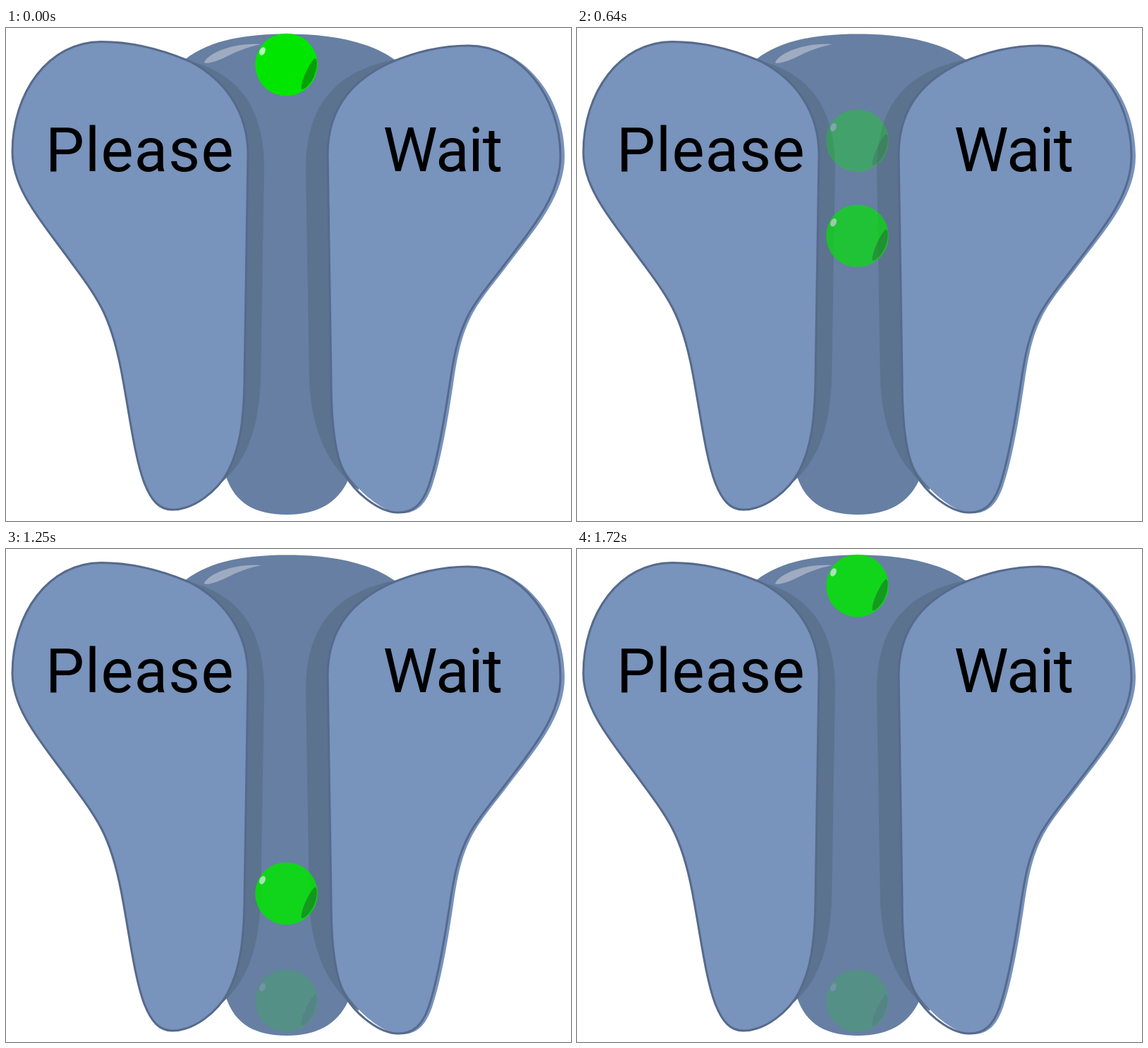
These frames come from a looping animation (801 px wide and 699 px high, 1750 ms). An HTML page:

```html
<!DOCTYPE html>
<html lang="en">
<head>
<meta charset="utf-8">
<title>Please Wait</title>
<style>
  html, body { margin: 0; width: 100%; height: 100%; overflow: hidden; background: #fff; }
  svg { display: block; }
  text { font: 400 87px Roboto, "Open Sans", sans-serif; }
  .wing { fill: #7893bc; }
  .edge { stroke: #566a8c; stroke-width: 3; }
  .shade { fill: #5b738f; }
</style>
</head>
<body>
<svg width="801" height="699" viewBox="0 0 801 699">
  <defs>
    <g id="ball">
      <circle r="44.3" fill="#00e600"/>
      <ellipse cx="-34" cy="-19" rx="4" ry="6" transform="rotate(25 -34 -19)" fill="#b8f7b8"/>
      <path d="M21.5 35C18.5 28 32 -2 40 -9C45 -10 44 7 38 19C33 29 25 36 21.5 35Z" fill="#05a005"/>
    </g>
  </defs>

  <path fill="#667fa3" d="M250 48C285 16 345 8.5 398 8.5C455 8.5 515 17 555 48L485 641
    C470 674 440 690 398 690C355 690 325 675 312 636Z"/>
  <path fill="#9fabc1" d="M281 49C284 38 318 20 362 23C340 28 330 32 318 38C300 47 284 52 281 49Z"/>
  <path class="shade" d="M265 48C335 68 366 120 366 200L361 500C358 560 346 613 300 649Z"/>
  <path class="shade" d="M580 40C500 50 425 80 425 200L430 500C433 570 455 620 500 655Z"/>

  <path class="wing edge" d="M135 19.5C60 19.5 9 92 9 176C9 228 50 274 88 326C106 351 126 376 139 404
    C152 432 160 465 166 500C176 555 183 610 196 645C206 670 217 683 236 683
    C268 683 300 655 314 630C331 598 337 560 338 500L343 180C343 120 312 75 262 48C225 32 180 19.5 135 19.5Z"/>
  <path class="wing" d="M657 25C737 25 792 100 792 182C792 238 749 286 712 335C695 358 676 379 662 404
    C645 436 640 465 634 505C626 558 617 612 604 650C595 675 583 688 561 688
    C535 688 500 658 482 630C467 605 461 560 461 500L457 180C457 105 500 70 545 49C580 34 615 25 657 25Z"/>
  <path class="edge" fill="none" d="M655 25C732 25 786 100 786 182C786 238 744 286 707 335C690 358 671 379 657 404
    C640 436 635 465 629 505C621 558 612 612 599 650C590 675 578 687 556 687
    C530 687 495 660 480 632C466 605 461 560 461 500L456 180C456 105 500 70 545 49C580 34 615 25 655 25Z"/>

  <text x="56" y="203" letter-spacing="1.2">Please</text>
  <text x="534.5" y="203" letter-spacing="-1">Wait</text>

  <use href="#ball" id="current"/>
  <use href="#ball" id="next"/>
</svg>
<script>
  const stops = [52, 159.7, 294.7, 488.5, 640.5];
  const HOLD = 200, STEP = 30, STEPS = 6;
  const SPAN = HOLD + STEP * (STEPS - 1);
  const [current, next] = ["current", "next"].map(id => document.getElementById(id));

  function place(ball, stop, opacity) {
    ball.setAttribute("transform", `translate(397.5 ${stops[stop % stops.length]})`);
    ball.setAttribute("opacity", opacity);
  }

  // Rest at each stop, then cross-fade to the following one in equal steps.
  function draw() {
    const t = performance.now() % (SPAN * stops.length);
    const stop = Math.floor(t / SPAN);
    const local = t % SPAN;
    const fade = local < HOLD ? 0 : (Math.floor((local - HOLD) / STEP) + 1) / STEPS;
    place(current, stop, 1 - fade);
    place(next, stop + 1, fade);
    requestAnimationFrame(draw);
  }
  draw();
</script>
</body>
</html>
```
